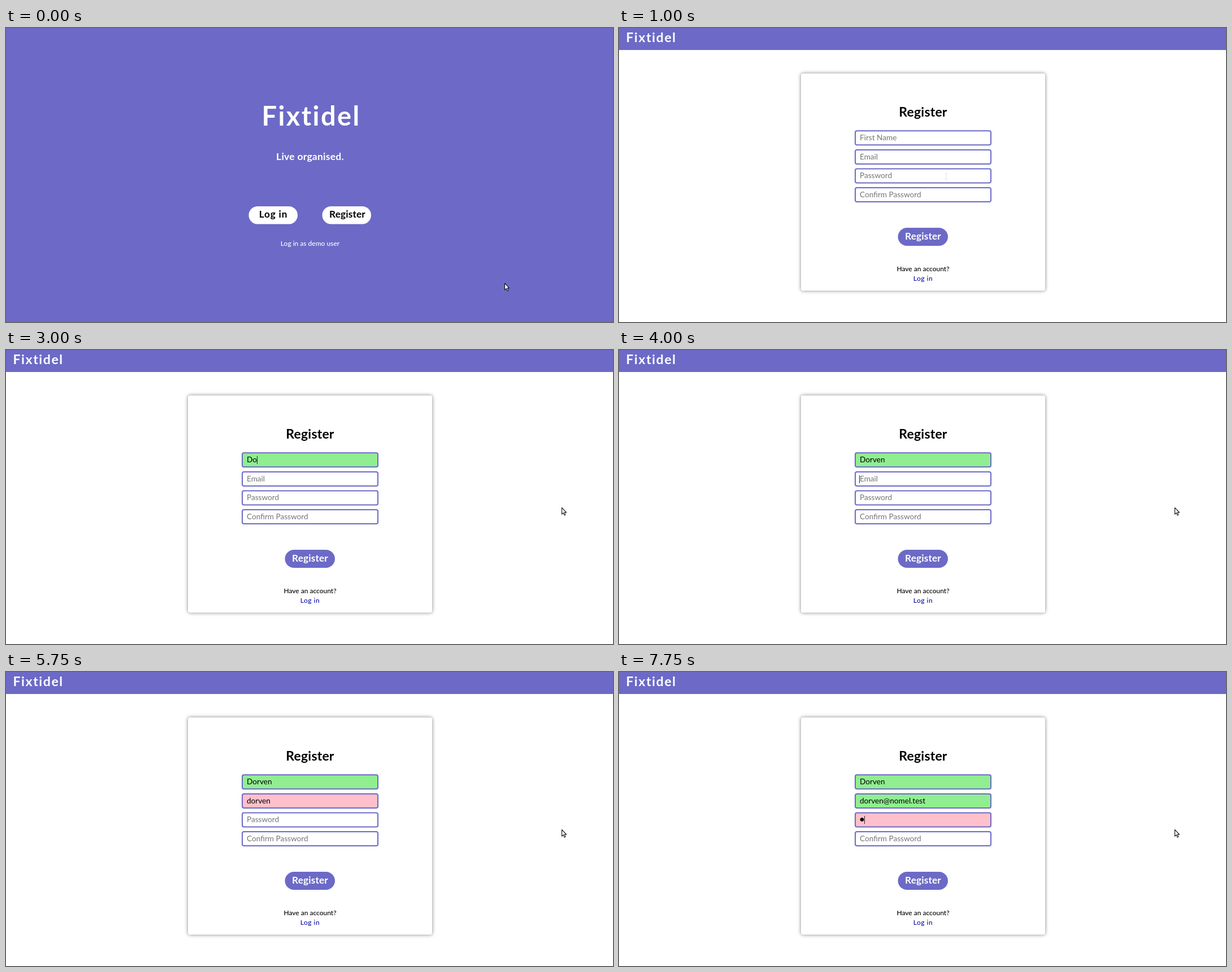
These frames come from a looping animation (1074 by 521 pixels, 8000 ms). An HTML page:

```html
<!DOCTYPE html>
<html lang="en">
<head>
<meta charset="utf-8">
<title>Register</title>
<style>
  html, body { margin: 0; width: 100%; height: 100%; overflow: hidden; background: #fff; }
  svg { display: block; width: 100%; height: 100%; }
  text { font-family: Lato, sans-serif; font-size: 13.6px; white-space: pre; }
  .mid { text-anchor: middle; }
  .bold { font-weight: 700; }
  .medium { font-weight: 500; }
  .light { fill: #fff; }
  .brand { fill: #6c6ac6; }
  .big { font-size: 47px; letter-spacing: 2.4px; }
  .logo { font-size: 23px; letter-spacing: 1.6px; }
  .title { font-size: 23px; letter-spacing: .2px; }
  .tagline { font-size: 17.5px; letter-spacing: .25px; }
  .button { font-size: 17.2px; letter-spacing: .15px; }
  .loose { letter-spacing: .8px; }
  .small { font-size: 12px; }
  .link { fill: #0d0db0; letter-spacing: .5px; }
  .status { font-size: 7.6px; fill: #5f5db5; }
  .card { fill: #fff; filter: drop-shadow(0 0 3px rgba(0, 0, 0, .5)); }
  .box { stroke: #6c6ac6; stroke-width: 2; }
  .pointer { fill: #fff; stroke: #111; stroke-width: 1.1; stroke-linejoin: round; }
</style>
</head>
<body>
<svg viewBox="0 0 1074 521" preserveAspectRatio="none">
  <g id="home">
    <rect class="brand" width="1074" height="521"/>
    <text class="mid bold light big" x="540" y="173">Fixtidel</text>
    <text class="mid bold light tagline" x="538" y="234">Live organised.</text>
    <rect class="light" x="429.5" y="316" width="86.5" height="31.5" rx="15.7"/>
    <text class="mid bold button loose" x="473" y="336">Log in</text>
    <rect id="join" x="559.5" y="316" width="86.5" height="31.5" rx="15.7"/>
    <text class="mid bold button" x="604" y="336">Register</text>
    <text class="mid medium light small" x="538" y="385.5">Log in as demo user</text>
    <g id="status">
      <rect y="510" width="169" height="11" fill="#7c7acb"/>
      <text class="status" x="2" y="520">https://www.fixtidel-calendar.co.uk/register</text>
    </g>
  </g>

  <g id="form">
    <rect width="1074" height="521" fill="#fff"/>
    <rect class="brand" width="1074" height="39"/>
    <text class="bold light logo" x="12.5" y="24.5">Fixtidel</text>
    <rect class="card" x="322" y="80.5" width="432" height="385" rx="4"/>
    <text class="mid bold title" x="538" y="157">Register</text>
    <g id="fields"></g>
    <circle id="bullet" cx="430" cy="261.5" r="3.3"/>
    <rect id="caret" width="1" height="14" fill="#222"/>
    <rect class="brand" x="493.5" y="354" width="88.5" height="32" rx="16"/>
    <text class="mid bold light button" x="538" y="375">Register</text>
    <text class="mid medium small" x="538" y="431">Have an account?</text>
    <text class="mid medium small link" x="538" y="448">Log in</text>
  </g>

  <g id="cursor">
    <path id="arrow" class="pointer" d="M0 0V11.6L2.7 9.2L4.5 13.4L6.4 12.6L4.6 8.4H8Z"/>
    <path id="hand" class="pointer" d="M0 1.2Q1.4-.6 2.6 1.2V6Q4.2 4.6 5.1 6.3Q6.7 5.2 7.5 6.9Q9.3 6.2 9.4 8V12.2L8 17H1L-3 10.6Q-3 8.4-1.3 9.2L0 10.6ZM2.6 6V9M5.1 6.3V9M7.5 6.9V9.4"/>
    <path id="beam" d="M-2.5-6Q0-6 0-4.5Q0-6 2.5-6M0-5V5M-2.5 6Q0 6 0 4.5Q0 6 2.5 6" fill="none" stroke="#555"/>
  </g>
</svg>
<script>
  const STEP = 250, LOOP = 8000, LEFT = 426, ROW = 33.6;
  const $ = id => document.getElementById(id);
  const show = (id, on) => $(id).setAttribute('visibility', on ? 'inherit' : 'hidden');

  const NAME = 'Dorven', EMAIL = 'dorven@nomel.test';
  const nameKeys = { start: 11, counts: [1, 2, 4, 6, 6] };
  const emailKeys = { start: 19, counts: [1, 3, 4, 6, 6, 7, 8, 11, 14, 17] };

  const cursorPath = [
    ['arrow', 882.5, 452.5], ['arrow', 836, 424], ['arrow', 706, 365], ['hand', 621, 323.5],
    ['beam', 579, 263, .15], ['beam', 535, 226], ['beam', 476, 196],
    ['arrow', 690, 222], ['arrow', 916, 264], ['arrow', 983.5, 279.5]
  ];

  // [first step, field holding the caret or -1]
  const caretRuns = [[0, -1], [7, 0], [9, -1], [11, 0], [15, -1], [16, 1], [23, -1],
                     [24, 1], [29, 2], [30, -1], [31, 2]];

  const fields = ['First Name', 'Email', 'Password', 'Confirm Password'].map((hint, i) => {
    $('fields').insertAdjacentHTML('beforeend',
      `<rect class="box" x="418" y="${182.3 + ROW * i}" width="240" height="25" rx="3"/>
       <text x="${LEFT}" y="${199 + ROW * i}"></text>`);
    const [box, label] = [...$('fields').children].slice(-2);
    return { hint, box, label };
  });

  function typed(text, { start, counts }, step) {
    const i = Math.min(step - start, counts.length - 1);
    return i < 0 ? '' : text.slice(0, counts[i]);
  }

  function fillField({ hint, box, label }, value, valid) {
    label.textContent = value || hint;
    label.setAttribute('fill', value ? '#000' : '#757575');
    box.setAttribute('fill', !value ? '#fff' : valid ? '#90ee90' : '#ffc0cb');
  }

  function drawCaret(step, values) {
    const row = caretRuns.filter(([from]) => from <= step).pop()[1];
    show('caret', row >= 0);
    if (row < 0) return;
    const width = row === 2 ? (values[2] ? 8.5 : 0)
      : values[row] ? fields[row].label.getComputedTextLength() + 1 : 0;
    $('caret').setAttribute('x', LEFT - 1 + Math.round(width));
    $('caret').setAttribute('y', 188 + Math.round(ROW * row));
  }

  function drawCursor(step) {
    const [shape, x, y, alpha = 1] = cursorPath[Math.min(step, cursorPath.length - 1)];
    for (const id of ['arrow', 'hand', 'beam']) show(id, id === shape);
    $('cursor').setAttribute('transform', `translate(${x} ${y})`);
    $('cursor').setAttribute('opacity', alpha);
  }

  function render(step) {
    const hover = step === 3;
    show('home', step < 4);
    show('form', step >= 4);
    show('status', hover);
    $('join').setAttribute('fill', hover ? '#dcdcdc' : '#fff');

    const secret = step >= 31 ? ' ' : '';
    const values = [typed(NAME, nameKeys, step), typed(EMAIL, emailKeys, step), secret, ''];
    fillField(fields[0], values[0], true);
    fillField(fields[1], values[1], /^\w+@\w+(\.\w+)?$/.test(values[1]));
    fillField(fields[2], values[2], false);
    fillField(fields[3], values[3], false);
    show('bullet', secret);
    drawCaret(step, values);
    drawCursor(step);
  }

  const begin = performance.now();
  let last = -1;
  function tick() {
    const step = Math.floor((performance.now() - begin) % LOOP / STEP);
    if (step !== last) render(last = step);
    requestAnimationFrame(tick);
  }
  tick();
</script>
</body>
</html>
```
